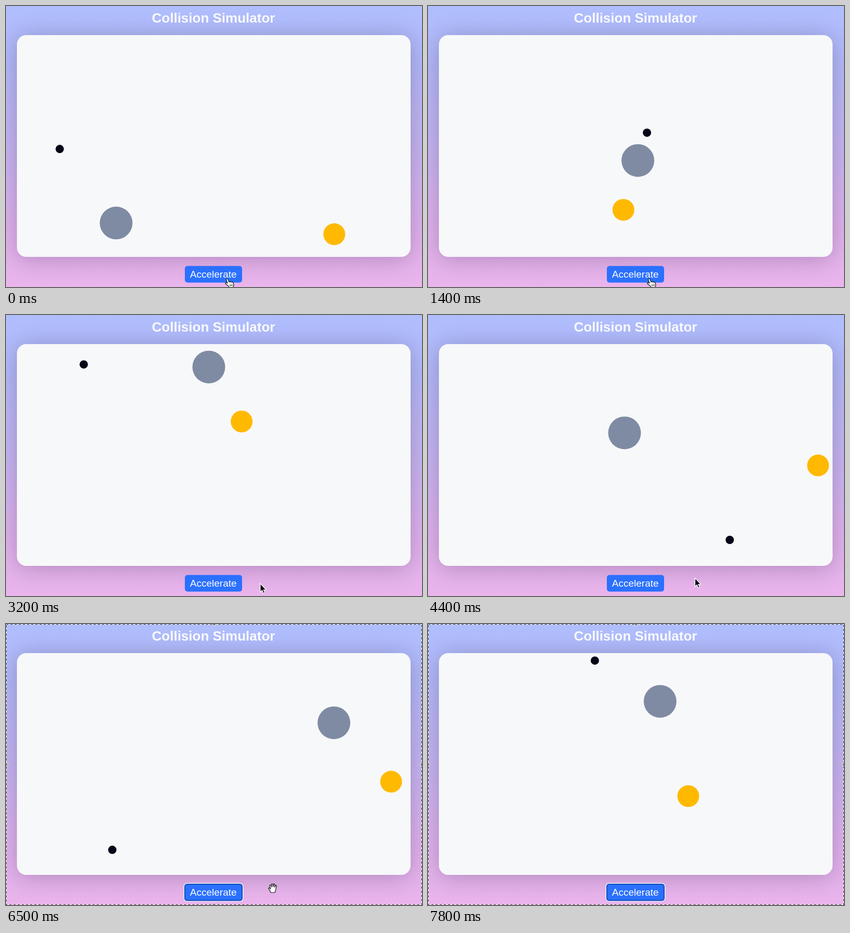
Animation of 800x541 px, one loop 7900 ms. Source, as an HTML page:

```html
<!DOCTYPE html>
<html lang="en">
<head>
<meta charset="utf-8">
<title>Collision Simulator</title>
<style>
  html, body { margin: 0; width: 100%; height: 100%; overflow: hidden; }
  .stage {
    position: relative; width: 800px; height: 541px; overflow: hidden;
    background: linear-gradient(#b0befe, #b4bafa 20%, #c9b6f2 52%, #e1b3ee 78%, #eab4ec);
    font-family: "Liberation Sans", Arial, sans-serif;
  }
  .card {
    position: absolute; left: 20.5px; top: 55.5px; width: 757px; height: 427.5px;
    border-radius: 18px; background: #f7f8fa;
    box-shadow: 0 4px 46px rgba(30, 20, 50, .27);
  }
  svg { position: absolute; inset: 0; }
  text { text-anchor: middle; fill: #f8fafc; }
  .title { font-size: 26px; font-weight: bold; }
  .label { font-size: 19px; fill: #fff; }
  .glove { fill: #fff; stroke: #111; stroke-width: 1.2; stroke-linejoin: round; }
</style>
</head>
<body>
<div class="stage">
  <div class="card"></div>
  <svg width="800" height="541" viewBox="0 0 800 541">
    <text class="title" x="399" y="32">Collision Simulator</text>

    <g id="balls" transform="translate(.3 .3)"></g>

    <rect x="344" y="500.5" width="110" height="32" rx="5" fill="#2b70ff"/>
    <g id="ring" fill="none">
      <rect x="342.3" y="499.3" width="113.4" height="34.6" rx="6" stroke="#fff" stroke-width="1.3"/>
      <rect x="343.9" y="500.9" width="110.2" height="31.4" rx="4.5" stroke="#0f4fb5" stroke-width="2"/>
    </g>
    <text class="label" x="398.7" y="523">Accelerate</text>

    <g id="select">
      <rect x=".5" y=".5" width="799" height="540" fill="none" stroke="#fff"/>
      <rect x=".5" y=".5" width="799" height="540" fill="none" stroke="#333" stroke-dasharray="4"/>
      <g fill="#808080" stroke="#fff">
        <circle cx="400" r="3.5"/>
        <circle cy="270.5" r="3.5"/>
        <circle cx="800" cy="270.5" r="3.5"/>
        <circle cx="400" cy="541" r="3.5"/>
      </g>
    </g>

    <g id="pointer" class="glove">
      <path d="M1 2C2 0 4 0 4.600 2l1.900 5c.8-1 2-1 2.800 0 .8-1 2-.8 2.700.4 1-.6 2.300 0 2.600 1.200l.7 3.400c.3 1.600-.2 2.800-.9 4v2H7.200l-.6-1.600C5 14.700 3 13 .2 10.800c-1.600-1.300-.4-3 1.200-2.500l2 1Z"/>
      <path d="M8.300 11.500v3.500m2.300-3.500v3.500m2.100-3.500v3" stroke-width=".9"/>
    </g>
    <path id="arrow" stroke="#fff" stroke-width="1.2" d="M0 0V16.300L3.600 13 6 18.800l2.800-1.100L6.300 12H11.200Z"/>
    <path id="palm" class="glove" d="M4.600 17.500C4 14.500 2 12.600.6 10.300c-.7-1.500 1-2.500 2.200-1.300l1.500 1.600-1.600-6c-.3-1.700 1.800-2.200 2.400-.7L6.300 7 6 2c0-1.800 2.200-1.900 2.500-.2l.7 4.700.9-4.700c.4-1.500 2.400-1.200 2.300.4L12 7.300l1.500-3c.8-1.300 2.500-.4 2 1l-1.400 7.200c-.4 2-1 3-1.400 5Z"/>
  </svg>
</div>
<script>
const LOOP = 7900, STEP = 100;
const box = { left: 21, top: 56, right: 777, bottom: 483 };
const $ = id => document.getElementById(id);

// A ball keeps its speed and bounces off the walls;
// each hit gives it a new velocity: [ms, px/s across, px/s down].
const balls = [
  { r: 8, color: "#020617", x: 103, y: 275,
    hits: [[0, 227, -279], [1460, 548.5, -567.5], [3200, 359, 352]] },
  { r: 31.5, color: "#7f8ba3", x: 211.5, y: 417.5,
    hits: [[0, 137, -86], [1460, 784, 308], [3200, 830, 352], [3600, -430, -17.5], [6660, -222, -141]] },
  { r: 21, color: "#ffb900", x: 631, y: 439,
    hits: [[0, -182.5, -33.5], [1400, -413.5, -246], [3200, 751.5, 199], [3600, -4.5, -524.5], [6660, -210, 98]] }
];

for (const ball of balls) {
  ball.node = document.createElementNS("http://www.w3.org/2000/svg", "circle");
  ball.node.setAttribute("r", ball.r);
  ball.node.setAttribute("fill", ball.color);
  $("balls").append(ball.node);
}

// Reflects a straight run back and forth between two walls.
function fold(v, lo, hi) {
  const span = hi - lo;
  const m = (((v - lo) % (2 * span)) + 2 * span) % (2 * span);
  return lo + (m > span ? 2 * span - m : m);
}

function placeBall({ node, r, x, y, hits }, t) {
  hits.forEach(([start, vx, vy], i) => {
    const end = i + 1 < hits.length ? hits[i + 1][0] : LOOP;
    const s = Math.max(0, Math.min(t, end) - start) / 1000;
    x = fold(x + vx * s, box.left + r, box.right - r);
    y = fold(y + vy * s, box.top + r, box.bottom - r);
  });
  node.setAttribute("cx", x);
  node.setAttribute("cy", y);
}

function ease(t, from, to) {
  const u = Math.min(1, Math.max(0, (t - from) / (to - from)));
  return u * u * (3 - 2 * u);
}

function show(id, on) {
  $(id).style.display = on ? "" : "none";
}

function moveTo(id, x, y) {
  $(id).setAttribute("transform", `translate(${x} ${y})`);
}

function draw(t) {
  balls.forEach(ball => placeBall(ball, t));

  const leave = ease(t, 2500, 3000), drift = ease(t, 3300, 3800);
  const overButton = t < 2700, captured = t >= 5900;
  moveTo("pointer", 422.5 + 66.5 * leave, 524.5 - 8 * leave);
  moveTo("arrow", 427 + 62 * leave + 24.5 * drift, 526 - 9 * leave - 10.5 * drift);
  moveTo("palm", 504.5, 499.5);
  show("pointer", overButton);
  show("arrow", !overButton && !captured);
  show("palm", captured && t < 7200);
  show("ring", t >= 4700);
  show("select", captured);
}

const began = performance.now();
function tick() {
  const t = (performance.now() - began) % LOOP;
  draw(Math.floor(t / STEP) * STEP);
  requestAnimationFrame(tick);
}
tick();
</script>
</body>
</html>
```
